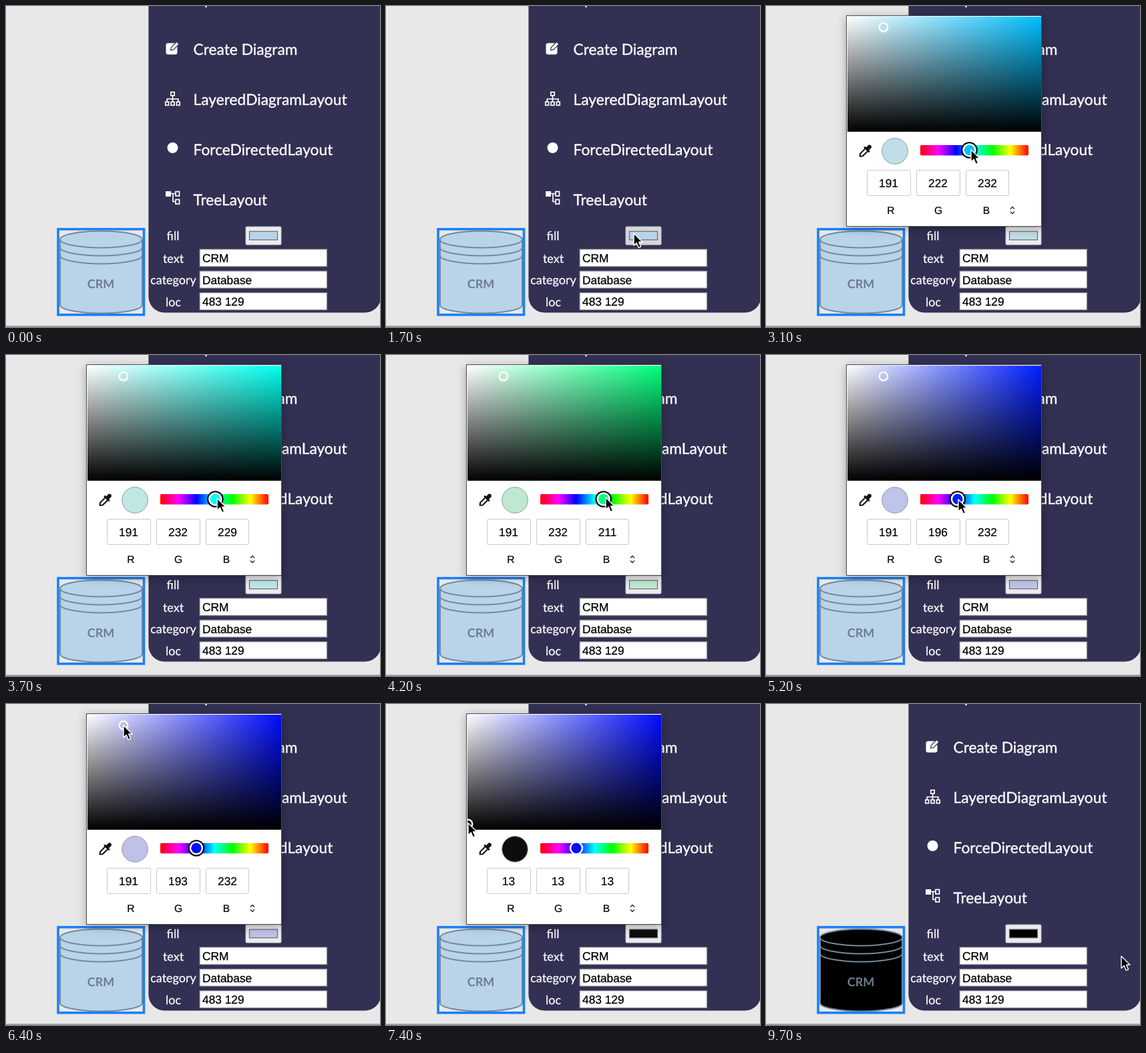
Animation, 560 px wide and 480 px high, one loop 9.8 s. Source, as an HTML page:

```html
<!DOCTYPE html>
<html lang="en">
<head>
<meta charset="utf-8">
<title>Colour picker</title>
<style>
html, body { margin: 0; width: 100%; height: 100%; overflow: hidden; background: #e8e8e8; }
svg { display: block; width: 560px; height: 480px; text-rendering: geometricPrecision; }
.menu { font: 22.75px Lato, sans-serif; fill: #fff; stroke: #fff; stroke-width: .35; }
.label { font: 18px Lato, sans-serif; fill: #fff; stroke: #fff; stroke-width: .25; text-anchor: middle; }
.value { font: 17.33px "Liberation Sans", Arial, sans-serif; fill: #000; stroke: #000; stroke-width: .3; }
.channel { font: 17.33px "Liberation Sans", Arial, sans-serif; fill: #000; stroke: #000; stroke-width: .2; text-anchor: middle; }
.channel.name { font-size: 15.6px; }
.field { fill: #fff; stroke: #7b7b82; stroke-width: 1.2; }
.box { fill: #fff; stroke: #c8c8d0; }
.shadow { filter: drop-shadow(0 3px 7px rgba(0, 0, 0, .3)); }
</style>
</head>
<body>
<svg viewBox="0 0 560 480">
  <defs>
    <linearGradient id="white"><stop stop-color="#fff"/><stop offset="1" stop-color="#fff" stop-opacity="0"/></linearGradient>
    <linearGradient id="black" x2="0" y2="1"><stop stop-color="#000" stop-opacity="0"/><stop offset="1" stop-color="#000"/></linearGradient>
    <linearGradient id="spectrum">
      <stop stop-color="#f00"/><stop offset=".167" stop-color="#f0f"/><stop offset=".333" stop-color="#00f"/>
      <stop offset=".5" stop-color="#0ff"/><stop offset=".667" stop-color="#0f0"/><stop offset=".833" stop-color="#ff0"/>
      <stop offset="1" stop-color="#f00"/>
    </linearGradient>
    <clipPath id="area"><rect x="122" y="16" width="290" height="172"/></clipPath>
  </defs>

  <rect width="560" height="480" fill="#e8e8e8"/>
  <path d="M0 479H560" stroke="#8d8d8d" stroke-width="1.3"/>

  <!-- database node -->
  <g stroke="#75899b" stroke-width="2">
    <path id="body" d="M81 349A61.5 12.5 0 0 1 204 349V447A61.5 12.5 0 0 1 81 447Z"/>
    <path fill="none" d="M81 349A61.5 12.5 0 0 0 204 349M81 361A61.5 12.5 0 0 0 204 361M81 373A61.5 12.5 0 0 0 204 373"/>
  </g>
  <text x="142" y="421.5" font-family="Lato, sans-serif" font-size="18" font-weight="700" text-anchor="middle" fill="#6e7d8c">CRM</text>
  <rect x="78" y="333.7" width="128.5" height="128" fill="none" stroke="#1a80fa" stroke-width="3.6"/>

  <!-- side panel -->
  <rect x="213.4" y="-40" width="348" height="498.6" rx="24" fill="#323053"/>
  <g class="menu">
    <text x="280.6" y="-2">Update</text>
    <text x="280.6" y="73.4">Create Diagram</text>
    <text x="280.6" y="148.4">LayeredDiagramLayout</text>
    <text x="280.6" y="223.4">ForceDirectedLayout</text>
    <text x="280.6" y="298.4">TreeLayout</text>
  </g>
  <g fill="#fff">
    <rect x="239.5" y="55.5" width="17" height="17" rx="3"/>
    <path d="M246.5 66L247.2 62L255.5 53.7L259 57.2L250.7 65.4Z" stroke="#323053" stroke-width="1.2"/>
    <circle cx="249.5" cy="212" r="8"/>
    <rect x="239" y="277" width="8" height="8"/>
  </g>
  <g fill="none" stroke="#fff" stroke-width="1.7">
    <path d="M249.5 134V143M241.2 143V139H257.8V143"/>
    <rect x="246.8" y="128.8" width="5.4" height="5"/>
    <rect x="238.8" y="143.4" width="4.8" height="5"/>
    <rect x="247.1" y="143.4" width="4.8" height="5"/>
    <rect x="255.4" y="143.4" width="4.8" height="5"/>
    <path d="M247 280.5H254M250 280.5V292.5H254"/>
    <rect x="254" y="277.5" width="5.5" height="6.5"/>
    <rect x="254" y="289.5" width="5.5" height="6.5"/>
  </g>
  <g class="label">
    <text x="250" y="350">fill</text>
    <text x="250.5" y="384">text</text>
    <text x="250.5" y="416">category</text>
    <text x="250.5" y="449">loc</text>
  </g>
  <rect id="button" x="359" y="330" width="53" height="27" rx="1.5" stroke="#c0c0c6"/>
  <rect id="swatch" x="364.5" y="337" width="42" height="12.7" stroke="#686b71" stroke-width="1.2"/>
  <rect class="field" x="290" y="363.7" width="190.7" height="26"/>
  <rect class="field" x="290" y="396.2" width="190.7" height="25.8"/>
  <rect class="field" x="290" y="428.7" width="190.7" height="25.8"/>
  <g class="value">
    <text x="294" y="383">CRM</text>
    <text x="294" y="415.5">Database</text>
    <text x="294" y="448">483 129</text>
  </g>

  <g id="picker">
    <rect class="shadow" x="120.5" y="14.5" width="292" height="315" fill="#fff" stroke="#4a4a52"/>
    <g clip-path="url(#area)">
      <rect id="hueFill" x="122" y="16" width="290" height="172"/>
      <rect x="122" y="16" width="290" height="172" fill="url(#white)"/>
      <rect x="122" y="16" width="290" height="172" fill="url(#black)"/>
      <circle id="shadeThumb" r="6.3" stroke="#fff" stroke-width="2.4"/>
    </g>
    <g transform="translate(148.5 217) rotate(45)" fill="#111">
      <rect x="-3" y="-12" width="6" height="9" rx="3"/>
      <rect x="-5.5" y="-5" width="11" height="3" rx="1"/>
      <path d="M-2.6 -2V8L0 11L2.6 8V-2" fill="none" stroke="#111" stroke-width="2"/>
    </g>
    <circle id="preview" cx="193" cy="217" r="19.3" stroke="#8f999e"/>
    <rect x="231" y="208" width="162" height="15.5" rx="2" fill="url(#spectrum)"/>
    <g id="hueThumb">
      <circle id="focus" r="12.3" fill="#000"/>
      <circle r="10.2" fill="#fff"/>
      <circle id="hueDot" r="7.7"/>
    </g>
    <rect class="box" x="151.5" y="245.5" width="65" height="38" rx="2"/>
    <rect class="box" x="225.5" y="245.5" width="65" height="38" rx="2"/>
    <rect class="box" x="299.5" y="245.5" width="64" height="38" rx="2"/>
    <g class="channel">
      <text id="r" x="183.5" y="271"/>
      <text id="g" x="257.5" y="271"/>
      <text id="b" x="331.5" y="271"/>
    </g>
    <g class="channel name">
      <text x="187" y="311">R</text>
      <text x="258" y="311">G</text>
      <text x="330" y="311">B</text>
    </g>
    <path d="M366 303.5L369 300.5L372 303.5M366 307.5L369 310.5L372 307.5" fill="none" stroke="#222" stroke-width="1.3"/>
  </g>

  <path id="cursor" d="M0 0V18L4.3 14.2L7.2 21.3L10.6 19.9L7.6 13H13Z" fill="#000" stroke="#fff" stroke-width="1.4" stroke-linejoin="round"/>
</svg>
<script>
const LOOP = 9800, STEP = 100, OPEN = 1800, CLOSE = 8800;
const el = id => document.getElementById(id);
const set = (id, attrs) => Object.entries(attrs).forEach(([k, v]) => el(id).setAttribute(k, v));

// rows: time, then values
const pointer = [
  [0, 566, 415], [1100, 373, 342], [1600, 371, 340], [2000, 371, 340], [2700, 301, 215], [2800, 301, 215],
  [3100, 307, 215], [3300, 307, 215], [4200, 329, 213], [4400, 329, 213], [5200, 288, 216], [5600, 286, 216],
  [5800, 286, 216], [6400, 176, 32], [6500, 176, 32], [7400, 123, 178], [7700, 121, 190],
  [8100, 121, 190], [8800, 532, 377]
];
const hues = [[2800, 207], [3100, 195], [3300, 195], [4200, 149.5], [4400, 149.5], [5200, 233], [5600, 237]];
const shades = [[6500, .177, .91], [7400, 0, .051], [7700, 0, 0]];

function sample(track, t) {
  const next = track.findIndex(row => row[0] > t);
  if (next === 0) return track[0].slice(1);
  if (next < 0) return track[track.length - 1].slice(1);
  const a = track[next - 1], b = track[next];
  const p = (t - a[0]) / (b[0] - a[0]), e = p * p * (3 - 2 * p);
  return a.slice(1).map((v, i) => v + (b[i + 1] - v) * e);
}

function hsvToRgb(h, s, v) {
  return [5, 3, 1].map(n => {
    const k = (n + h / 60) % 6;
    return Math.round(255 * v * (1 - s * Math.max(0, Math.min(k, 4 - k, 1))));
  });
}

function draw(t) {
  const [x, y] = sample(pointer, t), [hue] = sample(hues, t), [s, v] = sample(shades, t);
  const rgb = hsvToRgb(hue, s, v), color = `rgb(${rgb})`, pure = `rgb(${hsvToRgb(hue, 1, 1)})`;
  const hover = x > 359 && x < 412 && y > 330 && y < 357;

  set('cursor', { transform: `translate(${x} ${y})` });
  set('button', { fill: hover ? '#d6d6d8' : '#ececee' });
  set('swatch', { fill: t < OPEN ? '#b9d3e9' : color });
  set('body', { fill: t < CLOSE ? '#b9d3e9' : '#000' });
  set('picker', { visibility: t >= OPEN && t < CLOSE ? 'visible' : 'hidden' });
  set('hueFill', { fill: pure });
  set('hueDot', { fill: pure });
  set('hueThumb', { transform: `translate(${304.5 - (hue - 195) * .465} 215.5)` });
  set('focus', { opacity: t >= 2800 && t < 6500 ? 1 : 0 });
  set('shadeThumb', { cx: 123 + s * 299, cy: 188 - v * 171.5, fill: color });
  set('preview', { fill: color });
  ['r', 'g', 'b'].forEach((id, i) => { el(id).textContent = rgb[i]; });
}

const start = performance.now();
function tick() {
  const t = (performance.now() - start) % LOOP;
  draw(Math.floor(t / STEP) * STEP);
  requestAnimationFrame(tick);
}
tick();
</script>
</body>
</html>
```
